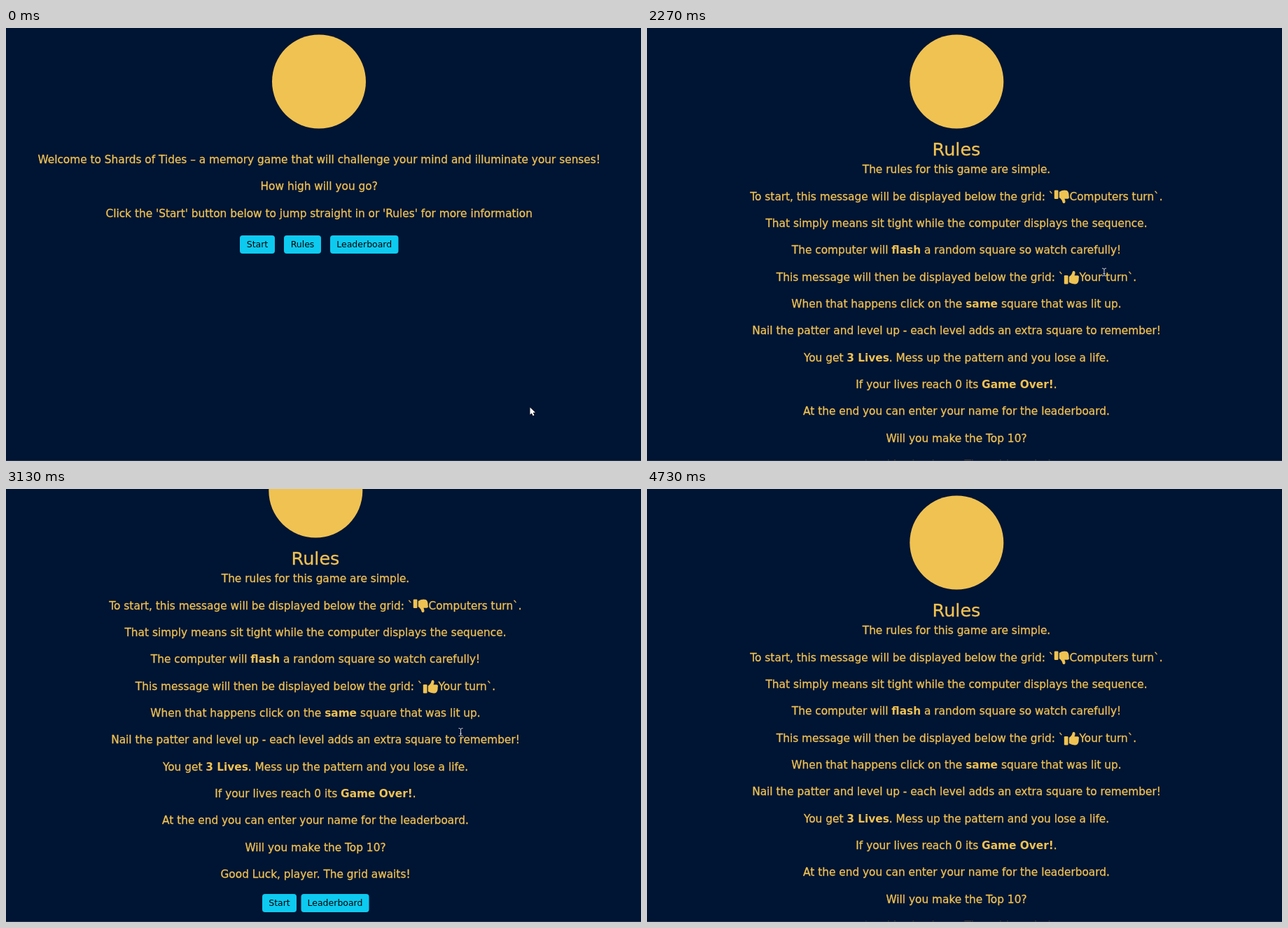
These frames come from a looping animation (907x618 px, 5.27 s). An HTML page with a canvas:

```html
<!DOCTYPE html>
<html lang="en">
<head>
<meta charset="utf-8">
<title>Shards of Tides</title>
<style>
  html, body { margin: 0; width: 100%; height: 100%; overflow: hidden; background: #001433; }
  canvas { display: block; }
</style>
</head>
<body>
<canvas id="stage" width="907" height="618"></canvas>
<script>
const ctx = document.getElementById('stage').getContext('2d');
const W = 907, H = 618, LOOP = 5270, FPS = 15;
const NAVY = '#001433', GOLD = '#efc252';
const FACE = '"DejaVu Sans", Verdana, sans-serif';
const PITCH = 38.33, PAGE_TURN = 1330;

const welcome = [
  'Welcome to Shards of Tides – a memory game that will challenge your mind and illuminate your senses!',
  'How high will you go?',
  "Click the 'Start' button below to jump straight in or 'Rules' for more information"
];

// *bold*, {down} and {up} are inline marks
const rules = [
  'The rules for this game are simple.',
  'To start, this message will be displayed below the grid: `{down}Computers turn`.',
  'That simply means sit tight while the computer displays the sequence.',
  'The computer will *flash* a random square so watch carefully!',
  'This message will then be displayed below the grid: `{up}Your turn`.',
  'When that happens click on the *same* square that was lit up.',
  'Nail the patter and level up - each level adds an extra square to remember!',
  'You get *3 Lives*. Mess up the pattern and you lose a life.',
  'If your lives reach 0 its *Game Over!*.',
  'At the end you can enter your name for the leaderboard.',
  'Will you make the Top 10?',
  'Good Luck, player. The grid awaits!'
];

// time, x, y, shape
const pointerKeys = [
  [0, 748, 541, 'arrow'], [70, 742, 532, 'arrow'], [200, 660, 445, 'arrow'],
  [330, 535, 348, 'arrow'], [400, 492, 321, 'hand'], [470, 464, 318, 'hand'],
  [530, 421, 324, 'arrow'], [600, 426, 319, 'hand'], [1070, 431, 312, 'hand'],
  [1200, 435, 313, 'hand'], [1270, 447, 317, 'hand'], [1330, 530, 335, 'arrow'],
  [1470, 670, 357, 'arrow'], [1530, 706, 360, 'arrow'], [1600, 716, 357, 'arrow'],
  [1670, 713, 351, 'arrow'], [1800, 697, 349, 'beam'], [1930, 674, 349, 'beam'],
  [2070, 657, 349, 'beam'], [2130, 654, 349, 'beam'], [2200, 654, 349, 'beam'],
  [2270, 653, 348.5, 'beam'], [2470, 653, 348.5, 'beam'], [2530, 649.5, 347, 'beam'],
  [3400, 649.5, 347, 'beam'], [3470, 647, 346, 'arrow'], [3730, 639, 342, 'arrow'],
  [3800, 639, 342, 'arrow'], [3870, 638, 342.5, 'arrow'], [4270, 638, 342.5, 'arrow'],
  [4330, 600, 352, 'arrow'], [4400, 430, 395, 'arrow'], [4530, 120, 482, 'arrow'],
  [4670, 3, 604, 'arrow'], [4730, 0, 700, 'none']
];

const scrollKeys = [
  [0, 0], [2600, 0], [2670, 2], [2730, 5], [2800, 19], [2870, 43], [2930, 61],
  [3000, 70], [3070, 73], [3130, 74], [4000, 74], [4070, 47], [4130, 24],
  [4200, 11], [4270, 4], [4330, 1], [4400, 0]
];

const clamp = v => Math.max(0, Math.min(1, v));
const fade = (t, on, off) => clamp((t - on) / 150) - clamp((t - off) / 150);

function sample(keys, t) {
  let i = 0;
  while (i < keys.length - 1 && keys[i + 1][0] <= t) i++;
  const a = keys[i], b = keys[i + 1] || a;
  const k = b === a ? 0 : (t - a[0]) / (b[0] - a[0]);
  return a.map((v, n) => typeof v === 'number' ? v + (b[n] - v) * k : v);
}

function thumb(x, y, down) {
  ctx.save();
  ctx.translate(x, y);
  if (down) { ctx.translate(0, 19); ctx.scale(1, -1); }
  ctx.beginPath();
  ctx.roundRect(0.3, 6.5, 5.7, 12.5, 1.2);
  ctx.fill();
  ctx.beginPath();
  ctx.moveTo(7.3, 8.5);
  ctx.quadraticCurveTo(11.5, 5.5, 12, 2);
  ctx.quadraticCurveTo(12.6, -0.3, 14.8, 0.4);
  ctx.quadraticCurveTo(17.2, 1.6, 15, 6.7);
  ctx.lineTo(19.8, 6.7);
  ctx.quadraticCurveTo(22.2, 7.4, 21.2, 10.4);
  ctx.quadraticCurveTo(21.4, 16.5, 18.4, 18.4);
  ctx.quadraticCurveTo(13, 20, 7.3, 16.5);
  ctx.closePath();
  ctx.fill();
  ctx.restore();
}

function setFont(size, bold) {
  ctx.font = `${bold ? 'bold ' : ''}${size}px ${FACE}`;
}

function line(str, cx, y, size = 15.35) {
  const base = Math.round(y);
  const runs = str.split(/(\*[^*]+\*|\{\w+\})/).filter(Boolean).map(s => {
    if (s[0] === '{') return { icon: s, w: 22 };
    const bold = s[0] === '*';
    const text = bold ? s.slice(1, -1) : s;
    setFont(size, bold);
    return { text, bold, w: ctx.measureText(text).width };
  });
  let x = cx - runs.reduce((sum, r) => sum + r.w, 0) / 2;
  ctx.fillStyle = ctx.strokeStyle = GOLD;
  ctx.lineWidth = 0.3;
  for (const r of runs) {
    if (r.icon) {
      thumb(x, base - 14.5, r.icon === '{down}');
    } else {
      setFont(size, r.bold);
      ctx.fillText(r.text, x, base);
      if (!r.bold) ctx.strokeText(r.text, x, base);
    }
    x += r.w;
  }
}

function button(label, x, y, w, glow = 0) {
  const mix = (a, b) => Math.round(a + (b - a) * glow);
  ctx.fillStyle = `rgb(${mix(13, 49)},${mix(202, 210)},${mix(240, 242)})`;
  ctx.beginPath();
  ctx.roundRect(x, y, w, 26, 4);
  ctx.fill();
  ctx.fillStyle = '#000';
  setFont(12.5);
  ctx.textAlign = 'center';
  ctx.fillText(label, x + w / 2, y + 17);
  ctx.textAlign = 'left';
}

function emblem(cx) {
  ctx.fillStyle = GOLD;
  ctx.beginPath();
  ctx.arc(cx, 76.5, 67, 0, Math.PI * 2);
  ctx.fill();
}

function homePage(t) {
  emblem(447);
  welcome.forEach((s, i) => line(s, 447.2, 193 + PITCH * i));
  button('Start', 334, 296, 50);
  button('Rules', 397, 296, 53, fade(t, 540, 1300));
  button('Leaderboard', 463, 296, 97.5, fade(t, 340, 510));
}

function rulesPage(scroll) {
  ctx.save();
  ctx.translate(0, -scroll);
  emblem(442.3);
  line('Rules', 442, 182, 25.5);
  rules.forEach((s, i) => line(s, 442, 207.3 + PITCH * i));
  button('Start', 366, 652, 49);
  button('Leaderboard', 421.5, 652, 97);
  ctx.restore();
}

function outline(points) {
  ctx.beginPath();
  points.forEach(p => ctx.lineTo(p[0], p[1]));
  ctx.closePath();
  ctx.stroke();
  ctx.fill();
}

const shapes = {
  arrow() {
    outline([[0.5, 0.5], [0.5, 10.8], [2.9, 8.7], [4.7, 12.6], [6.5, 11.8], [4.8, 8], [8, 7.7]]);
  },
  hand() {
    ctx.lineJoin = 'round';
    outline([[-1, 0.7], [0.8, 0.7], [1.2, 5], [5, 5.8], [6.6, 7.2], [6.5, 11], [5, 13.5],
      [5, 15.5], [-1.6, 15.5], [-2, 13.5], [-4.8, 9.8], [-4.4, 8.4], [-1.5, 9.7]]);
    ctx.beginPath();
    for (const x of [0.2, 2.2, 4.2]) { ctx.moveTo(x, 10); ctx.lineTo(x, 13); }
    ctx.lineWidth = 0.6;
    ctx.stroke();
  },
  beam() {
    ctx.strokeStyle = '#c9cdd4';
    ctx.beginPath();
    for (const s of [-1, 1]) {
      ctx.moveTo(-3, 5.5 * s);
      ctx.quadraticCurveTo(0, 5.5 * s, 0, 4 * s);
      ctx.quadraticCurveTo(0, 5.5 * s, 3, 5.5 * s);
    }
    ctx.moveTo(0, -4.5);
    ctx.lineTo(0, 4.5);
    ctx.moveTo(-1.5, 2);
    ctx.lineTo(1.5, 2);
    ctx.stroke();
  },
  none() {}
};

function pointer(t) {
  const [, x, y, kind] = sample(pointerKeys, t);
  ctx.save();
  ctx.translate(x, y);
  ctx.fillStyle = '#fff';
  ctx.strokeStyle = '#000';
  ctx.lineWidth = 1;
  shapes[kind]();
  ctx.restore();
}

function draw(now) {
  const step = Math.floor((now % LOOP + 4) * FPS / 1000);
  const t = Math.round(step * 100 / FPS) * 10 % LOOP;
  ctx.fillStyle = NAVY;
  ctx.fillRect(0, 0, W, H);
  if (t < PAGE_TURN) homePage(t);
  else rulesPage(Math.round(sample(scrollKeys, t)[1]));
  pointer(t);
  ctx.fillStyle = '#26344e';
  ctx.fillRect(0, H - 1, W, 1);
}

const start = performance.now();
function tick() {
  draw(performance.now() - start);
  requestAnimationFrame(tick);
}
tick();
</script>
</body>
</html>
```
